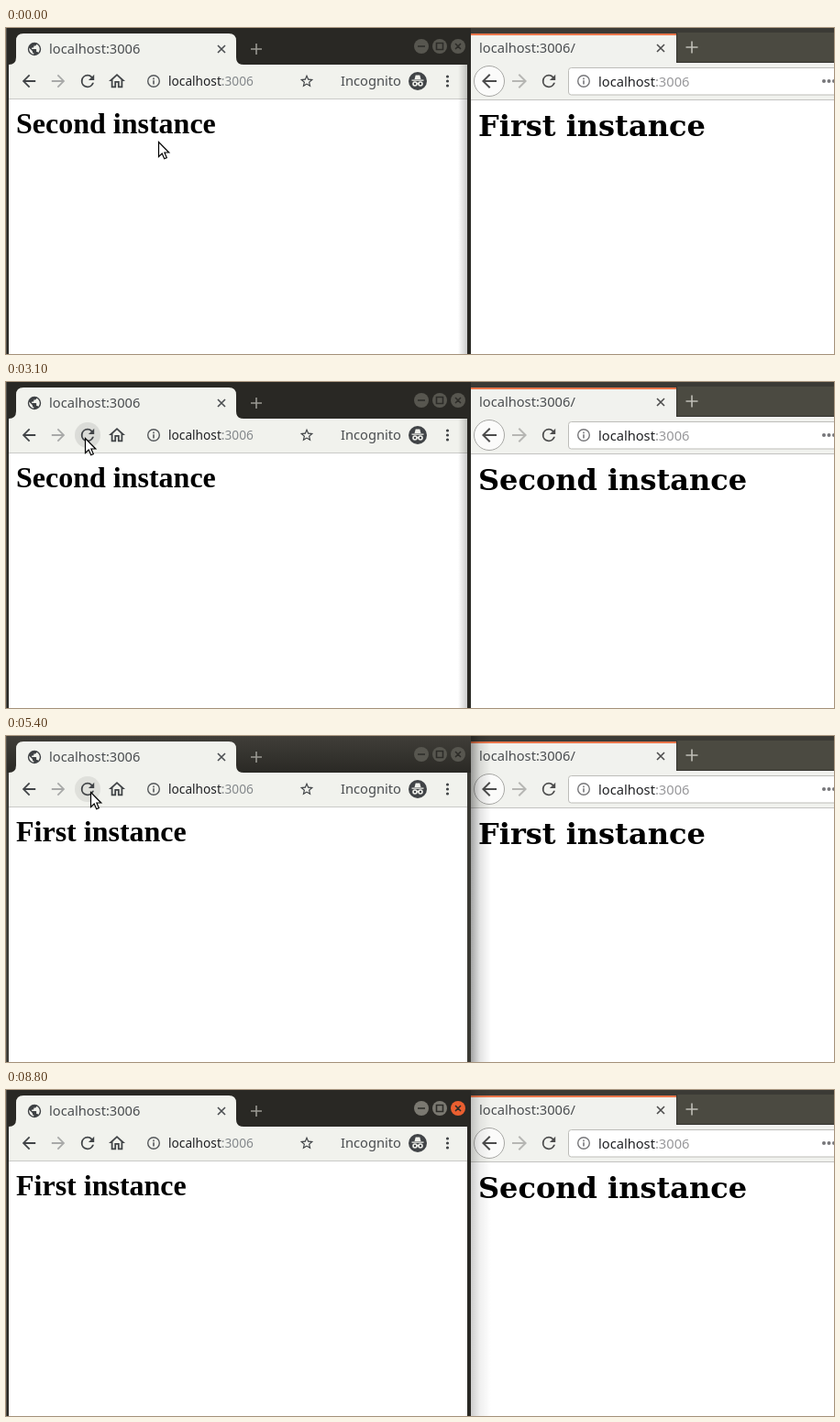
An HTML page for the animation above (8.9 s loop, 903 by 356 pixels).

```html
<!DOCTYPE html>
<html lang="en">
<head>
<meta charset="utf-8">
<title>Two browser windows</title>
<style>
  html, body { margin: 0; width: 100%; height: 100%; overflow: hidden; background: #fff; }
  svg { display: block; }
  text { font: 14.67px "Noto Sans", "Open Sans", sans-serif; fill: #4a4d50; }
  .url { fill: #202124; }
  .port { fill: #85898c; }
  #leftTitle { font: bold 32px "Liberation Serif", serif; fill: #000; }
  #rightTitle { font: bold 32px "DejaVu Serif", "Noto Serif", serif; fill: #000; }
  .line { fill: none; stroke-width: 1.6; }
</style>
</head>
<body>
<svg width="903" height="356" viewBox="0 0 903 356">
  <defs>
    <linearGradient id="activeBar" x2="0" y2="1">
      <stop stop-color="#403e39"/><stop offset="1" stop-color="#2a2925"/>
    </linearGradient>
    <linearGradient id="shadeRight">
      <stop stop-opacity=".36"/><stop offset=".45" stop-opacity=".11"/><stop offset="1" stop-opacity="0"/>
    </linearGradient>
    <linearGradient id="shadeLeft">
      <stop stop-opacity="0"/><stop offset="1" stop-opacity=".2"/>
    </linearGradient>
    <clipPath id="tabClip"><path d="M507 6H731V38H507z"/></clipPath>
    <path id="back" d="M20 11H7.8l5.6-5.6L12 4l-8 8 8 8 1.4-1.4L7.8 13H20z"/>
    <path id="reload" d="M17.65 6.35A7.96 7.96 0 0 0 12 4a8 8 0 1 0 7.73 10h-2.08A6 6 0 1 1 12 6c1.66 0 3.14.69 4.22 1.78L13 11h7V4z"/>
    <g id="info" class="line">
      <circle r="6.3" stroke-width="1.4"/><path d="M0-3.5v1.7M0-.7v4.2"/>
    </g>
    <path id="close" class="line" d="M-4-4 4 4M4-4-4 4"/>
  </defs>

  <!-- right window -->
  <path fill="#fff" d="M507 0H903V356H507z"/>
  <path fill="#3b3a35" d="M507 0H903V6H507z"/>
  <path fill="#4b4a41" d="M731 5H903V38H731z"/>
  <path fill="#33322d" d="M731 5h1v33h-1zM731 37H903v1H731z"/>
  <path fill="#f1f2ee" d="M507 6H731V38H903V78H507z"/>
  <path fill="#ea764b" d="M507 6H731v2H507z"/>
  <path fill="#c3c3c0" d="M507 78H903v1H507z"/>
  <g clip-path="url(#tabClip)"><circle id="burst" cx="524" cy="22"/></g>
  <text x="516" y="27">localhost:3006/</text>
  <use href="#close" x="714" y="22" stroke="#4c4c4c"/>
  <path class="line" stroke="#c0bfb7" stroke-width="2" d="M741.500 21h13M748 14.500v13"/>
  <circle cx="527" cy="58" r="16.500" fill="#fbfbfa" stroke="#a7a7a4"/>
  <rect id="rightHover" x="578" y="44" width="28" height="28" rx="2" fill="#d6d6d3"/>
  <use href="#back" transform="translate(527 58) translate(-12 -12)" fill="#4c4c4c"/>
  <use href="#back" transform="translate(560 58) scale(-1 1) translate(-12 -12)" fill="#b6b6b3"/>
  <use href="#reload" transform="translate(592 58) scale(.9) translate(-12 -12)" fill="#4c4c4c"/>
  <rect x="613.500" y="43.500" width="310" height="29.500" rx="3" fill="#fff" stroke="#bdbdb9"/>
  <use href="#info" x="630" y="58" stroke="#77777a"/>
  <text x="646" y="64" class="url">localhost<tspan fill="#98989b">:3006</tspan></text>
  <g fill="#77777a"><circle cx="892" cy="58" r="2"/><circle cx="897.500" cy="58" r="2"/><circle cx="903" cy="58" r="2"/></g>
  <text id="rightTitle" x="515" y="118"></text>
  <rect id="leftCast" x="507" width="22" height="356" fill="url(#shadeRight)"/>

  <!-- left window -->
  <path id="frame" d="M0 0H507V356H0z"/>
  <path id="bar" d="M0 0H507V40H0z"/>
  <path fill="#55534d" d="M0 0h1v356h-1z"/>
  <path fill="#fff" d="M3 78H503V356H3z"/>
  <path fill="#f1f2ed" d="M3 40q8 0 8-8V14q0-8 8-8H243q8 0 8 8V32q0 8 8 8H503V77H3z"/>
  <path fill="#cacac7" d="M3 77H503v1H3z"/>
  <use id="globe" href="#world" transform="translate(31 23) scale(.72) translate(-12 -12)"/>
  <defs><path id="world" fill="#3e4144" d="M12 2a10 10 0 1 0 0 20 10 10 0 0 0 0-20zm-1 17.930c-3.950-.49-7-3.850-7-7.930 0-.62.08-1.210.21-1.790L9 15v1c0 1.100.9 2 2 2zm6.900-2.540c-.26-.81-1-1.390-1.900-1.390h-1v-3c0-.55-.45-1-1-1H8v-2h2c.55 0 1-.45 1-1V7h2c1.100 0 2-.9 2-2v-.41c2.930 1.190 5 4.060 5 7.410 0 2.080-.8 3.970-2.100 5.390z"/></defs>
  <path id="spinner" class="line" stroke="#5f6368" stroke-width="2" d="M31 16.500a6.500 6.500 0 1 1-6.500 6.500"/>
  <text x="47" y="28" fill="#5f6368">localhost:3006</text>
  <use href="#close" x="235" y="23" stroke="#4a4d50"/>
  <path class="line" stroke="#9a9993" d="M267 23h12M273 17v12"/>
  <g id="buttons">
    <circle cx="453" cy="20" r="8"/><circle cx="473" cy="20" r="8"/><circle id="closeButton" cx="493" cy="20" r="8"/>
  </g>
  <path class="line" stroke="#2d2c28" stroke-width="1.300" d="M449 20h8M469.500 16.500h7v7h-7zM490 17l6 6M496 17l-6 6"/>
  <circle id="leftHover" cx="89" cy="58" r="14" fill="#cdcdca"/>
  <g fill="#414447">
    <use href="#back" transform="translate(25 58) scale(.9) translate(-12 -12)"/>
    <use href="#back" transform="translate(57 58) scale(-.9 .9) translate(-12 -12)" fill="#a8a9a8"/>
    <use href="#reload" transform="translate(89 58) scale(.9) translate(-12 -12)"/>
    <path transform="translate(121 58) scale(.9) translate(-12 -12)" d="M12 5.700l5 4.500V18h-2v-6H9v6H7v-7.800zM12 3 2 12h3v8h6v-6h2v6h6v-8h3z"/>
    <path transform="translate(328 58) scale(.72) translate(-12 -12)" d="M22 9.240l-7.190-.62L12 2 9.190 8.630 2 9.240l5.460 4.730L5.820 21 12 17.270 18.180 21l-1.630-7.030zM12 15.400l-3.760 2.270 1-4.280-3.320-2.880 4.380-.38L12 6.100l1.710 4.040 4.380.38-3.320 2.880 1 4.280z"/>
    <circle cx="449" cy="58" r="10"/>
    <circle cx="481.500" cy="53" r="1.600"/><circle cx="481.500" cy="58" r="1.600"/><circle cx="481.500" cy="63" r="1.600"/>
  </g>
  <path fill="#f1f2ed" d="M445.500 56l1.200-4.500h4.600l1.200 4.500zM442.500 56.500h13v1.200h-13z"/>
  <path class="line" stroke="#f1f2ed" stroke-width="1.200" d="M448 61a2 2 0 1 0-4 0 2 2 0 1 0 4 0q1-.7 2 0a2 2 0 1 0 4 0 2 2 0 1 0-4 0"/>
  <use href="#info" x="161" y="58" stroke="#55585b"/>
  <text x="177" y="63" class="url" style="font-size:13.700px">localhost<tspan class="port">:3006</tspan></text>
  <text x="365" y="63">Incognito</text>
  <text id="leftTitle" x="11" y="115"></text>
  <rect id="rightCast" x="493" width="10" y="40" height="316" fill="url(#shadeLeft)"/>

  <path id="cursor" d="M.5.5V16.500L4.200 13 6.700 18.800 9.300 17.600 6.900 12H11.800z" fill="#fff" stroke="#000" stroke-width="1.200"/>
</svg>
<script>
const LOOP = 8900, STEP = 100;
const $ = id => document.getElementById(id);
const set = (id, attrs) => Object.entries(attrs).forEach(([k, v]) => $(id).setAttribute(k, v));
const within = (t, spans) => spans.some(([a, b]) => t >= a && t < b);
const show = (id, on) => set(id, { opacity: +on });

// Cursor tip: time, x, y
const path = [
  [0, 166, 124], [700, 83, 60], [1300, 83, 60], [1700, 330, 96], [2000, 598, 64],
  [2500, 598, 64], [2900, 86, 61], [3700, 86, 61], [3800, 119, 59], [4100, 593, 66],
  [4600, 593, 66], [5000, 92, 61], [5600, 92, 61], [6000, 593, 60], [6500, 593, 60],
  [6800, 140, 85], [6900, 140, 85], [7200, 86, 67], [8000, 86, 67], [8500, 57, 3], [LOOP, 57, 3]
];
// Opacity of the reload highlight in the left window
const highlight = [[0, 0], [600, .5], [900, 1], [1500, 0], [2900, .6], [3900, 0], [5000, .5], [5700, 0], [7100, .6], [8200, 0]];
const focused = [[800, 2300], [3200, 4400], [5300, 6400], [7400, 8800]];
const buttonsLit = [[1000, 2300], [3500, 4400], [5600, 6400], [7400, LOOP]];
const bursts = [2376, 4460, 6425], BURST_TIME = 375;

function cursorAt(t) {
  const i = path.findIndex(p => p[0] > t);
  const [a, ax, ay] = path[i - 1], [b, bx, by] = path[i];
  const k = (t - a) / (b - a);
  return [Math.round(ax + (bx - ax) * k), Math.round(ay + (by - ay) * k)];
}

function drawBurst(t) {
  const start = bursts.find(b => t >= b && t < b + BURST_TIME);
  show('burst', start !== undefined);
  if (start === undefined) return;
  const p = 1 - (1 - (t - start) / BURST_TIME) ** 1.7;
  set('burst', { r: 3 + 270 * p, fill: `color-mix(in srgb, #0a84ff ${40 * (1 - p)}%, #f1f2ee)` });
}

function draw(t) {
  const active = within(t, focused), lit = within(t, buttonsLit), onTop = active || t >= 8800;
  const loading = within(t, [[1000, 1100], [3400, 3500], [5500, 5600]]);
  const title = first => (first ? 'First' : 'Second') + ' instance';

  $('leftTitle').textContent = title(within(t, [[3400, 5500], [7400, LOOP]]));
  $('rightTitle').textContent = title(within(t, [[0, 2400], [4500, 6500]]));
  set('frame', { fill: active ? '#3a3934' : '#292824' });
  set('bar', { fill: active ? 'url(#activeBar)' : '#292824' });
  set('buttons', { fill: lit ? '#7b7971' : '#57564f' });
  set('closeButton', { fill: lit ? '#ea5f30' : '#57564f' });
  set('leftCast', { opacity: active ? 1 : onTop ? .55 : 0 });
  show('rightCast', !onTop);
  show('globe', !loading);
  show('spinner', loading);
  set('leftHover', { opacity: highlight.findLast(h => h[0] <= t)[1] });
  show('rightHover', within(t, [[2000, 2700], [4100, 4700], [6000, 6600]]));
  set('cursor', { transform: `translate(${cursorAt(t)})` });
  show('cursor', t < 8500);
  drawBurst(t);
}

function tick() {
  const t = performance.now() % LOOP;
  draw(Math.floor(t / STEP) * STEP);
  requestAnimationFrame(tick);
}
tick();
</script>
</body>
</html>
```
